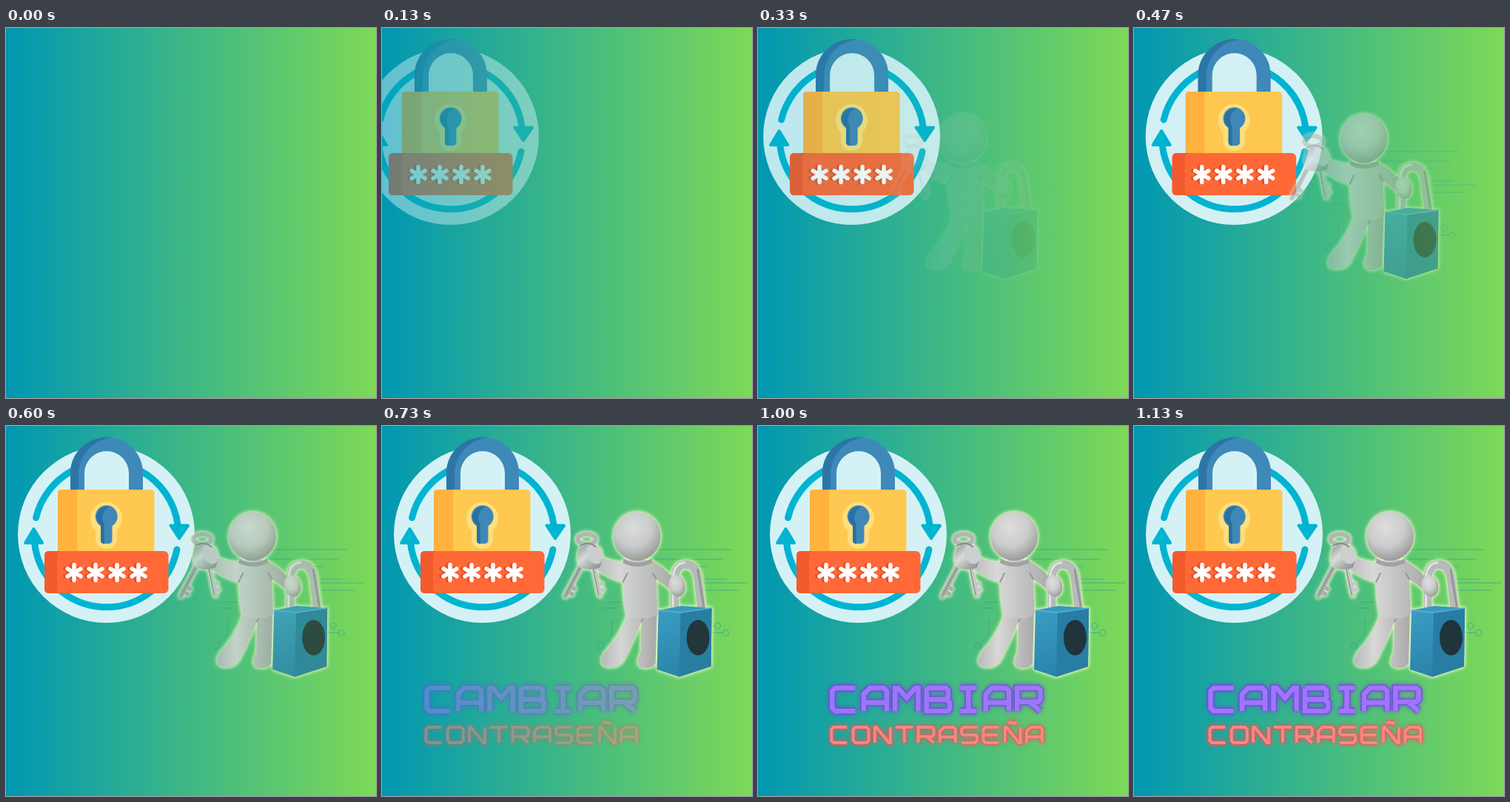
Animation, 500 px wide and 500 px high, one loop 8000 ms. Source, as an HTML page:

```html
<!DOCTYPE html>
<html lang="es">
<head>
<meta charset="utf-8">
<title>Cambiar contraseña</title>
<style>
html, body { margin: 0; width: 100%; height: 100%; overflow: hidden; background: #46b985; }
svg { display: block; width: 100vw; height: 100vh; }
.line { fill: none; stroke-linecap: round; stroke-linejoin: round; }
.word { fill: none; stroke-linejoin: miter; }
#figure .body { filter: drop-shadow(0 0 2px #e9f7cf) drop-shadow(0 0 2px #d5efa9); }
</style>
</head>
<body>
<svg viewBox="0 0 500 500" preserveAspectRatio="none">
  <defs>
    <linearGradient id="bg"><stop stop-color="#0097b2"/><stop offset="1" stop-color="#7ed957"/></linearGradient>
    <radialGradient id="head" cx=".42" cy=".32" r=".72">
      <stop stop-color="#dedede"/><stop offset=".55" stop-color="#cbcbcb"/><stop offset="1" stop-color="#959595"/>
    </radialGradient>
    <linearGradient id="skin"><stop stop-color="#b9b9b9"/><stop offset=".35" stop-color="#d8d8d8"/><stop offset="1" stop-color="#a9a9a9"/></linearGradient>
    <linearGradient id="steel" x2=".8" y2="1"><stop stop-color="#8d9495"/><stop offset=".45" stop-color="#d9dcdb"/><stop offset="1" stop-color="#8b9291"/></linearGradient>
    <linearGradient id="front" x2=".3" y2="1"><stop stop-color="#3b9ec6"/><stop offset="1" stop-color="#2b83aa"/></linearGradient>
    <path id="star" class="line" d="M0-10.5V10.5M-9-5.2L9 5.2M-9 5.2L9-5.2"/>
  </defs>
  <rect width="500" height="500" fill="url(#bg)"/>

  <g id="lock">
    <circle cx="135.5" cy="146.5" r="119.5" fill="#d4f2f6"/>
    <g class="line" stroke="#00b4d2" stroke-width="9">
      <path d="M40.500 124A97.500 97.500 0 0 1 89 60.700M182 60.700A97.500 97.500 0 0 1 232 133"/>
      <path d="M38.500 157A97.500 97.500 0 0 0 231 167"/>
    </g>
    <g fill="#00b4d2" stroke="#00b4d2" stroke-width="4" stroke-linejoin="round">
      <path d="M37.500 139L26 158H49ZM234 152L222.500 134.500H246Z"/>
    </g>
    <path d="M96.500 88V64A39.500 39.500 0 0 1 175.500 64V88" fill="none" stroke="#3f89ba" stroke-width="19"/>
    <path d="M87 88V64A49 49 0 0 1 143 15.500A50 50 0 0 0 98 64V88Z" fill="#2c76a7"/>
    <rect x="70" y="86" width="130.500" height="100" rx="5" fill="#ffc850"/>
    <path d="M96 86H75Q70 86 70 91V170H96Z" fill="#ffb23e"/>
    <path d="M121 141A21.500 22 0 1 1 150 141V153A14.500 13 0 0 1 121 153Z" fill="#ffdf7c"/>
    <path d="M128 135A15 15 0 1 1 143.500 135V154Q143.500 159 138 159H133Q128 159 128 154Z" fill="#3f87b8"/>
    <path d="M128 135A15 15 0 0 1 140 108.500A17 17 0 0 0 133 133V159Q128 159 128 154Z" fill="#2a71a3"/>
    <rect x="52" y="169" width="167.500" height="57" rx="6" fill="#ff6837"/>
    <path d="M76 169H58Q52 169 52 175V220Q52 226 58 226H76Q69 226 69 220V175Q69 169 76 169Z" fill="#f35a2d"/>
    <g id="stars" stroke-width="5.500"></g>
  </g>

  <g id="figure">
    <g class="line" stroke="#32a08b" stroke-width="1" opacity=".75">
      <path d="M368 167H473M366 180H461M410 190H440M420 207H467M430 212H496M436 222H483M306 238H326M300 246H318"/>
      <path d="M440 270H451M440 286L448 279.500H462M301 294L312 283V262"/>
      <circle cx="455" cy="270" r="4"/><circle cx="466" cy="279.500" r="4"/><circle cx="297" cy="297" r="4"/>
    </g>
    <g class="body">
      <g class="line" stroke="url(#steel)">
        <path d="M397 246V209Q397 188 411 187Q424 186 428 203L433 244" stroke-width="11" stroke="#b5baba"/>
        <path d="M394.500 246V207Q395 186 410 184.500" stroke-width="3" stroke="#e1e4e3"/>
        <path d="M428 194L436 243" stroke-width="2.500" stroke="#8d9493"/>
      </g>
      <path d="M336 243Q327 278 302 306Q293 321 303 325Q320 329 328 317Q342 289 352 264L351 306Q343 321 351 326Q364 330 371 321L373 250Z" fill="url(#skin)"/>
      <path d="M352 264L361 247" class="line" stroke="#979797" stroke-width="2"/>
      <path d="M328 184Q347 177 367 183Q380 189 397 207L390 220L372 207L374 255Q354 265 332 256Q327 234 327 211Q309 207 286 190Q280 180 291 174Q309 183 328 184Z" fill="url(#skin)"/>
      <path d="M327 211Q331 203 333 199M372 207Q369 201 367 199" class="line" stroke="#999" stroke-width="2"/>
      <path d="M328 179Q346 190 366 179L367 185Q346 195 327 185Z" fill="#a2a2a2"/>
      <ellipse cx="346" cy="149" rx="32" ry="33" fill="url(#head)"/>
      <g class="line">
        <ellipse cx="278" cy="153" rx="12" ry="7" stroke="#b3b6b6" stroke-width="6"/>
        <path d="M272 186L249 230M252 223L258 227M256 216L261 220" stroke="#aaaeae" stroke-width="6"/>
        <path d="M286 184L296 229M294 223L300 221M292 215L298 213" stroke="#c5c8c8" stroke-width="6"/>
        <path d="M272 186L250 228M285 184L294 228" stroke="#7c8283" stroke-width="1"/>
      </g>
      <path d="M269 164Q282 157 296 164Q302 177 296 191Q283 197 268 191Q262 178 269 164Z" fill="url(#steel)"/>
      <ellipse cx="289" cy="173" rx="10" ry="14" transform="rotate(-22 289 173)" fill="#cfcfcf"/>
      <path d="M269 162Q281 155 290 163" class="line" stroke="#858b8c" stroke-width="2"/>
      <path d="M375 249L406 243L447 246L446 325L403 339L373 329Z" fill="url(#front)"/>
      <path d="M405 252L447 246L446 325L403 339Z" fill="#277da3"/>
      <path d="M375 249L405 252L447 246" class="line" stroke="#59b3d0" stroke-width="1.500"/>
      <ellipse cx="400" cy="216" rx="11" ry="15" transform="rotate(-12 400 216)" fill="url(#head)"/>
      <ellipse cx="428.500" cy="286" rx="15.500" ry="24" fill="#21343b"/>
    </g>
  </g>

  <g id="words"></g>
</svg>
<script>
const $ = id => document.getElementById(id);

// Stroke lettering on a 30 by 30 cell
const glyphs = {
  C: 'M30 0H4L0 4V26L4 30H30',
  A: 'M0 30V8L8 0H26L30 4V30M0 19H30',
  M: 'M0 30V0H4L15 13L26 0H30V30',
  B: 'M0 0H25L28 3V12L25 15H0M25 15L30 19V27L27 30H0V0',
  I: 'M3 0H24M13.5 0V30M3 30H24',
  R: 'M0 30V0H27L30 3V15L27 18H0M16 18L30 30',
  O: 'M4 0H26L30 4V26L26 30H4L0 26V4Z',
  N: 'M0 30V0H3L27 30H30V0',
  T: 'M-2 0H32M15 0V30',
  S: 'M30 0H4L0 4V12L3 15H27L30 18V26L26 30H0',
  E: 'M30 0H4L0 4V26L4 30H30M0 15H28'
};
glyphs['Ñ'] = glyphs.N + 'M7-7L11-10L18-7L23-10';

function word(text, x, y, size, pitch, weight, fill, edge) {
  let paths = '';
  for (const c of text) {
    paths += `<path transform="translate(${x} ${y}) scale(${size})" d="${glyphs[c]}"/>`;
    x += c === 'I' ? pitch - 5 : pitch;
  }
  const layer = (color, width, style = '') =>
    `<g class="word" stroke="${color}" stroke-width="${width}" style="${style}">${paths}</g>`;
  return `<g role="img" aria-label="${text}">` +
    layer(edge, weight + 3, `opacity:.85;filter:drop-shadow(0 0 3px ${edge})`) +
    layer(fill, weight) + '</g>';
}

$('words').innerHTML =
  word('CAMBIAR', 103.5, 354, 1.04, 42.5, 6.3, '#a273ff', '#7148dc') +
  word('CONTRASEÑA', 102.5, 407, 0.7, 29.3, 5.6, '#ff8580', '#e0575c');

const star = (x, color) => `<use href="#star" x="${x}" y="198" stroke="${color}"/>`;
$('stars').innerHTML = [92, 121, 150, 179]
  .map(x => star(x - 3, '#e04f2a') + star(x, '#fff')).join('');

const loop = 8000, fps = 15, slide = 80, span = 500;
const parts = [['lock', 0], ['figure', 300], ['words', 600]].map(([id, start]) => [$(id), start]);

function draw(ms) {
  const time = Math.floor(ms * fps / 1000 + 0.06) * 1000 / fps;
  for (const [el, start] of parts) {
    const p = Math.min(1, Math.max(0, (time - start) / span));
    const rest = (1 - p) ** 2;
    el.setAttribute('transform', `translate(${-slide * rest} 0)`);
    el.setAttribute('opacity', 1 - rest);
  }
}

const begin = performance.now();
function tick() {
  draw((performance.now() - begin) % loop);
  requestAnimationFrame(tick);
}
tick();
</script>
</body>
</html>
```
